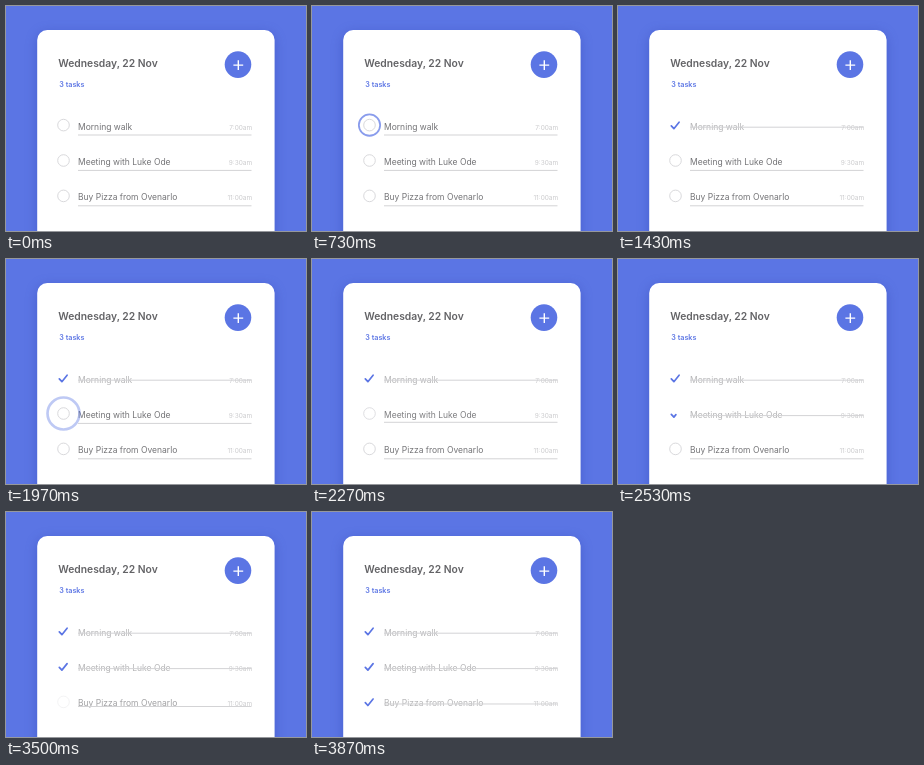
Write an HTML page that moves like this. It is 300 px wide and 225 px high and loops after 4.33 s.

```html
<!DOCTYPE html>
<html lang="en">
<head>
<meta charset="utf-8">
<title>Task list</title>
<style>
@property --ring { syntax: "<number>"; inherits: true; initial-value: 0; }
@property --done { syntax: "<number>"; inherits: true; initial-value: 0; }
@property --tick { syntax: "<number>"; inherits: true; initial-value: 0; }

html, body { margin: 0; width: 100%; height: 100%; overflow: hidden; background: #5b75e4; }
svg { display: block; width: 100%; height: 100%; font-family: Inter, "Open Sans", sans-serif; }
.card { fill: #fff; filter: drop-shadow(0 3px 6px rgba(35, 55, 165, .35)); }
.date { font-size: 10.3px; font-weight: 600; fill: #636366; }
.count { font-size: 7.2px; font-weight: 600; fill: #5b75e4; }
.plus { stroke: #fff; stroke-width: 1.4; }

.row { animation: 4330ms linear infinite; }
.row:nth-of-type(1) { animation-name: first; }
.row:nth-of-type(2) { animation-name: second; }
.row:nth-of-type(3) { animation-name: third; }

.label { font-size: 8.5px; fill: #747477; opacity: calc(1 - .48 * var(--done)); }
.time { font-size: 6.5px; fill: #cbcbcd; text-anchor: end; }
.line { stroke: #d3d3d5; transform: translateY(calc(var(--done) * -7.8px)); }
.box, .ring { fill: none; stroke-width: 1; }
.box { stroke: #d9d9dc; opacity: calc(1 - var(--done)); }
.ring {
  stroke: #5b75e4;
  opacity: min(1 - var(--ring), var(--ring) * 20);
  transform: scale(calc(1 + 2.74 * var(--ring)));
}
.tick {
  fill: none; stroke: #5b75e4; stroke-width: 1.7;
  stroke-linecap: round; stroke-linejoin: round;
  stroke-dasharray: 1 2;
  stroke-dashoffset: calc(1 - var(--tick));
  opacity: min(1, var(--tick) * 50);
}

@keyframes first {
  0%, 15.47% { --ring: 0; }
  20.46%, 100% { --ring: 1; }
  0%, 20.79% { --done: 0; animation-timing-function: cubic-bezier(.455, .03, .515, .955); }
  27.02%, 100% { --done: 1; }
  0%, 26.79% { --tick: 0; animation-timing-function: cubic-bezier(.215, .61, .355, 1); }
  33.72%, 100% { --tick: 1; }
}
@keyframes second {
  0%, 42.49% { --ring: 0; }
  47.48%, 100% { --ring: 1; }
  0%, 50.81% { --done: 0; animation-timing-function: cubic-bezier(.455, .03, .515, .955); }
  57.04%, 100% { --done: 1; }
  0%, 56.81% { --tick: 0; animation-timing-function: cubic-bezier(.215, .61, .355, 1); }
  63.74%, 100% { --tick: 1; }
}
@keyframes third {
  0%, 68.59% { --ring: 0; }
  73.58%, 100% { --ring: 1; }
  0%, 77.14% { --done: 0; animation-timing-function: cubic-bezier(.455, .03, .515, .955); }
  83.37%, 100% { --done: 1; }
  0%, 83.14% { --tick: 0; animation-timing-function: cubic-bezier(.215, .61, .355, 1); }
  90.07%, 100% { --tick: 1; }
}
</style>
</head>
<body>
<svg viewBox="0 0 300 225">
  <defs>
    <g id="mark">
      <circle class="box" r="5.8"/>
      <circle class="ring" r="6"/>
      <path class="tick" pathLength="1" d="M-4.2 .8L-1.6 3.6L3.6 -2.9"/>
      <path class="line" d="M14.5 9.9H188"/>
    </g>
  </defs>
  <rect class="card" x="31.2" y="24" width="237.4" height="230" rx="10"/>
  <text class="date" x="52.3" y="61.2">Wednesday, 22 Nov</text>
  <text class="count" x="53.3" y="80.8">3 tasks</text>
  <circle cx="232" cy="58.6" r="13.3" fill="#5b75e4"/>
  <path class="plus" d="M227.4 59.1H237.2M232.3 54.2V64"/>

  <g class="row" transform="translate(57.5 119.1)">
    <text class="label" x="14.5" y="4.4">Morning walk</text>
    <text class="time" x="188.7" y="4.5">7:00am</text>
    <use href="#mark"/>
  </g>
  <g class="row" transform="translate(57.5 154.5)">
    <text class="label" x="14.5" y="4.4">Meeting with Luke Ode</text>
    <text class="time" x="188.7" y="4.5">9:30am</text>
    <use href="#mark"/>
  </g>
  <g class="row" transform="translate(57.5 189.9)">
    <text class="label" x="14.5" y="4.4">Buy Pizza from Ovenarlo</text>
    <text class="time" x="188.7" y="4.5">11:00am</text>
    <use href="#mark"/>
  </g>
</svg>
</body>
</html>
```
